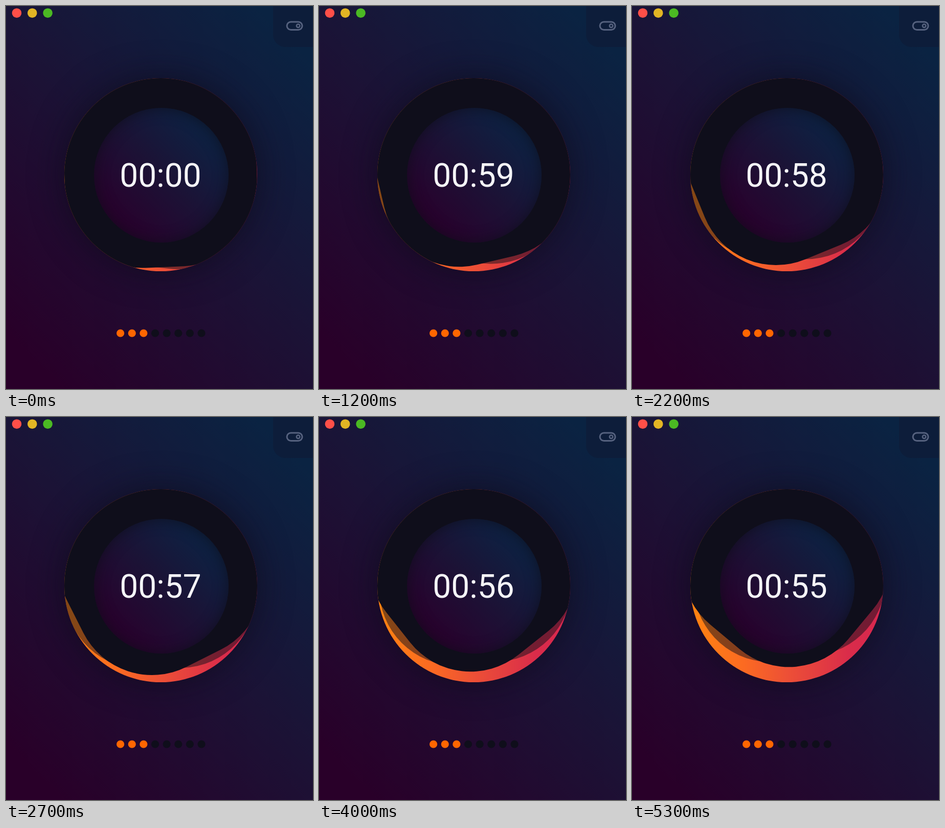
An HTML page that plays this animation: 600x748 px, repeating every 5.4 s.

```html
<!DOCTYPE html>
<html lang="en">
<head>
<meta charset="utf-8">
<title>Timer</title>
<style>
  html, body { margin: 0; width: 100%; height: 100%; overflow: hidden; }
  body { position: relative; background: linear-gradient(45deg, #290029 8%, #1b1336 52%, #0a2342 92%); }
  div, svg { position: absolute; }
  .corner { right: 0; top: 0; width: 78px; height: 80px; border-radius: 0 0 0 24px; background: #0d1d3a; }
  .ring {
    left: 113.5px; top: 141px; width: 377px; height: 377px;
    border-radius: 50%; box-shadow: 0 0 65px #0b0a17a0;
  }
  .liquid {
    inset: 0; border-radius: 50%; overflow: hidden;
    background: linear-gradient(90deg, #ff8410, #fb6a22 28%, #ed5036 50%, #da2c4a 82%, #d8274f);
  }
  .wave { left: .5px; top: .5px; width: 376px; height: 376px; border-radius: 40%; background: #0f0e1b; }
  #back { opacity: .5; }
  .hole {
    left: 58px; top: 57.5px; width: 263px; height: 263px; border-radius: 50%;
    background: linear-gradient(45deg, #2a002c 14%, #1b1336 52%, #0b2445 88%);
    box-shadow: inset 0 0 28px #0f0e1bd0;
  }
  text { font: 64px Roboto, sans-serif; fill: #f5f5f8; text-anchor: middle; }
</style>
</head>
<body>
<div class="corner"></div>
<div class="ring">
  <div class="liquid">
    <div class="wave" id="back"></div>
    <div class="wave" id="front"></div>
  </div>
  <div class="hole"></div>
</div>
<svg width="600" height="748">
  <g id="dots"></g>
  <g fill="none" stroke="#56627f" stroke-width="3">
    <rect x="549" y="31" width="30" height="15.5" rx="7.75"/>
    <circle cx="571" cy="38.7" r="3.2" stroke-width="2.6"/>
  </g>
  <text id="clock" x="302" y="353">00:00</text>
</svg>
<script>
const LOOP = 5400, STEP = 100, FIRST_TICK = 600;
const $ = id => document.getElementById(id);

const dot = (x, y, r, fill) => `<circle cx="${x}" cy="${y}" r="${r}" fill="${fill}"/>`;
let dots = ['#ff4f48', '#e2b524', '#4bb923'].map((c, i) => dot(21 + 30.3 * i, 13.7, 9.3, c)).join('');
for (let i = 0; i < 8; i++) dots += dot(223.6 + 22.63 * i, 639, 7.6, i < 3 ? '#ff6600' : '#0f0e1b');
$('dots').innerHTML = dots;

function place(wave, rise, angle) {
  wave.style.transform = `translateY(${-rise}px) rotate(${angle}deg)`;
}

function draw(now) {
  const ms = Math.floor(now % LOOP / STEP) * STEP, s = ms / 1000;
  const rise = 8 + 7 * s;
  place($('front'), rise, -2.5 - 9 * s);
  place($('back'), rise, 6.5 - 3 * s);
  const left = ms < FIRST_TICK ? '00' : 59 - Math.floor((ms - FIRST_TICK) / 1000);
  $('clock').textContent = `00:${left}`;
}

const start = performance.now();
function loop() {
  draw(performance.now() - start);
  requestAnimationFrame(loop);
}
loop();
</script>
</body>
</html>
```
